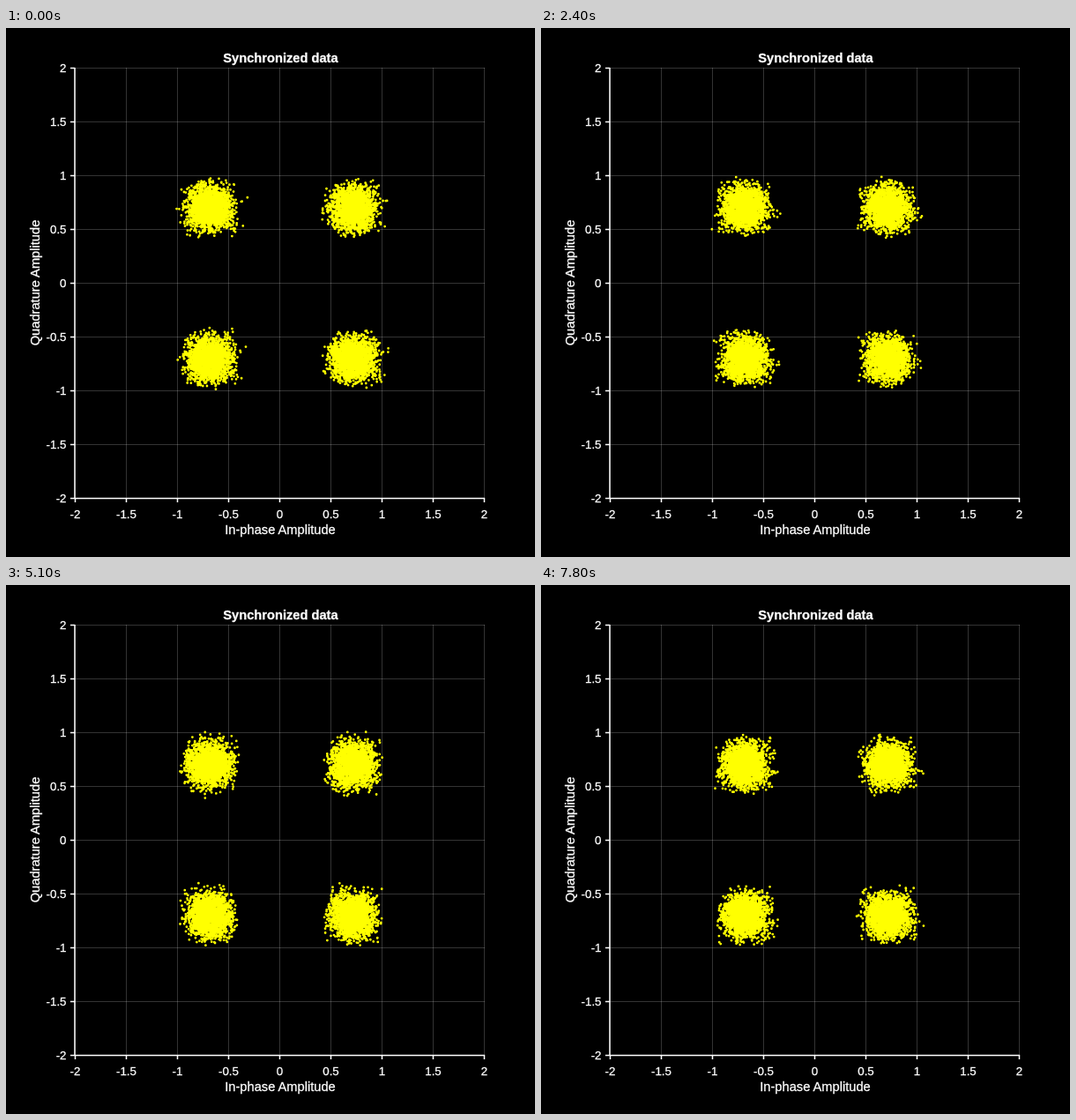
Write an HTML page with a canvas that moves like this. It is 600 px wide and 600 px high and loops after 8 s.

```html
<!DOCTYPE html>
<html lang="en">
<head>
<meta charset="utf-8">
<title>Synchronized data</title>
<style>
  html, body { margin: 0; width: 100%; height: 100%; overflow: hidden; background: #000; }
  svg, canvas { position: absolute; left: 0; top: 0; width: 600px; height: 600px; }
  text {
    fill: #fff; stroke: #fff; stroke-width: 0.3px; text-anchor: middle;
    font: 14.667px "Liberation Sans", Arial, sans-serif;
  }
  .tick { font-size: 13.333px; }
  .end { text-anchor: end; }
  .title { font-weight: bold; }
</style>
</head>
<body>
<svg id="plot" viewBox="0 0 600 600"></svg>
<canvas id="dots" width="600" height="600"></canvas>
<script>
const LOOP = 8000, STEP = 300;
const POINTS = 2000, SPREAD = 36, TAILS = 5;
const px = v => 310.5 + v * 116;
const py = v => 289.5 - v * 122;

// Axes, grid and labels
const line = (d, color, width) =>
  `<path d="${d}" stroke="${color}" stroke-width="${width}" fill="none"/>`;
const label = (x, y, s, cls = '', more = '') =>
  `<text x="${x}" y="${y}" class="${cls}" ${more}>${s}</text>`;

let rows = '', columns = '', ticks = '', labels = '';
for (let v = -2; v <= 2; v += 0.5) {
  const x = px(v), y = py(v);
  columns += `M${x} 45V533`;
  rows += `M78 ${y}H543`;
  ticks += `M${x} 533v5M78 ${y}h-5`;
  labels += label(x, 556, v, 'tick') + label(68.5, y + 4.5, v, 'tick end');
}
document.getElementById('plot').innerHTML =
  line(columns, '#fff3', 1) + line(rows, '#fff3', 1) +
  line(ticks + 'M78 45V533.5H543', '#fff', 1.5) + labels +
  label(311.5, 39, 'Synchronized data', 'title') +
  label(311, 574, 'In-phase Amplitude') +
  label(0, 0, 'Quadrature Amplitude', '', 'transform="translate(38 289) rotate(-90)"');

function seeded(seed) {
  let s = seed * 7919 + 12345 | 0;
  return () => {
    s = s + 0x6D2B79F5 | 0;
    let t = Math.imul(s ^ s >>> 15, s | 1);
    t ^= t + Math.imul(t ^ t >>> 7, t | 61);
    return ((t ^ t >>> 14) >>> 0) / 4294967296;
  };
}

const ctx = document.getElementById('dots').getContext('2d');
ctx.fillStyle = '#ff0';

function dot(x, y) {
  ctx.moveTo(x + 1.4, y);
  ctx.arc(x, y, 1.4, 0, 7);
}

function drawCloud(cx, cy, tails, rnd) {
  // Three uniform draws give a bell shape with a firm edge
  const noise = () => SPREAD * ((rnd() + rnd() + rnd()) * 2 / 3 - 1);
  for (let i = 0; i < POINTS; i++) dot(cx + noise(), cy + noise());
  for (const { angle, reach } of tails) {
    for (let r = reach; r > 28; r -= 4) {
      dot(cx + r * Math.cos(angle) + rnd() * 6 - 3, cy + r * Math.sin(angle) + rnd() * 6 - 3);
    }
  }
}

// All four clouds of a step share the directions of their tails
function draw(step) {
  const rnd = seeded(step + 1);
  const tails = Array.from({ length: TAILS }, () =>
    ({ angle: rnd() * 2 * Math.PI, reach: 34 + rnd() * 10 }));
  ctx.clearRect(0, 0, 600, 600);
  ctx.beginPath();
  for (const cy of [204, 375]) {
    for (const cx of [231, 393.5]) drawCloud(cx, cy, tails, rnd);
  }
  ctx.fill();
}

let shown = -1;
const start = performance.now();
function tick(now) {
  const step = Math.floor(Math.max(0, now - start) % LOOP / STEP);
  if (step !== shown) draw(shown = step);
  requestAnimationFrame(tick);
}
tick(start);
</script>
</body>
</html>
```
